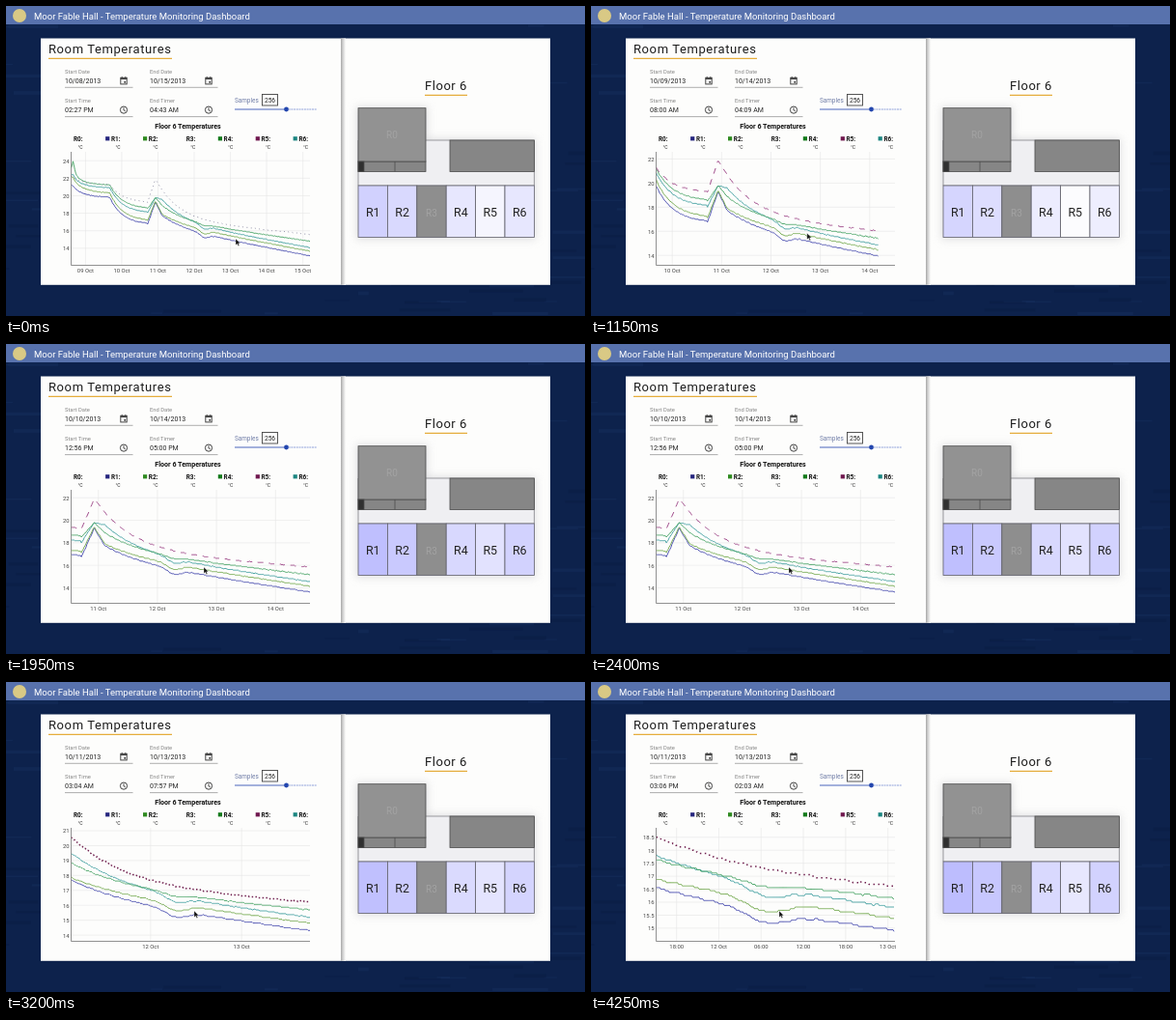
These frames come from a looping animation (600 by 321 pixels, 4.3 s). An HTML page:

```html
<!DOCTYPE html>
<html lang="en">
<head>
<meta charset="utf-8">
<title>Temperature Dashboard</title>
<style>
  html, body { margin: 0; width: 100%; height: 100%; overflow: hidden; background: #0d224c; }
  svg { display: block; width: 100vw; height: 100vh; font-family: Roboto, "Open Sans", sans-serif; }
  .label { font-size: 5.8px; fill: #858585; }
  .value { font-size: 7px; fill: #222; }
  .tick { font-size: 5.9px; fill: #444; }
  .key { font-size: 6.4px; font-weight: 700; fill: #111; }
  .unit { font-size: 5px; fill: #333; }
  .rule { stroke: #8d8d8d; stroke-width: .7; }
  .icon { fill: none; stroke: #444; stroke-width: 1; }
  .room { stroke: #62626c; stroke-width: .8; }
  .name { font-size: 12.4px; fill: #222; text-anchor: middle; }
  .faint { font-size: 10px; fill: #a3a3a3; }
  .curve { fill: none; stroke-width: .9; stroke-linejoin: round; }
  .grid { stroke: #e6e6e6; stroke-width: .6; }
</style>
</head>
<body>
<svg viewBox="0 0 600 321" preserveAspectRatio="none">
  <defs>
    <linearGradient id="fold">
      <stop offset="0" stop-color="#a6a6a6"/>
      <stop offset=".4" stop-color="#cfcfcf"/>
      <stop offset="1" stop-color="#fdfdfc"/>
    </linearGradient>
    <filter id="soft" x="-30%" y="-30%" width="160%" height="160%"><feGaussianBlur stdDeviation="4"/></filter>
    <clipPath id="plot"><rect x="67.5" y="150" width="248" height="118"/></clipPath>
  </defs>

  <rect width="600" height="321" fill="#0d224c"/>
  <g id="streaks"></g>
  <rect width="600" height="19" fill="#5872ad"/>
  <circle cx="14" cy="10" r="7" fill="#d9c985"/>
  <text x="29" y="13.6" font-size="9.5" fill="#fff">Moor Fable Hall - Temperature Monitoring Dashboard</text>

  <rect x="36" y="33.5" width="528" height="255.3" fill="#fdfdfc"/>
  <rect x="347" y="33.5" width="5" height="255.3" fill="url(#fold)"/>
  <g font-size="13" fill="#1d1d1d">
    <text x="44" y="49" letter-spacing=".6">Room Temperatures</text>
    <text x="434" y="86.6" letter-spacing=".55">Floor 6</text>
  </g>
  <path d="M44 54.3H172M434 92.3H478" stroke="#e5ad3c" stroke-width="1.3"/>

  <g id="form"></g>
  <text x="237" y="100" font-size="6.4" fill="#717ea8">Samples</text>
  <rect x="265.5" y="91.5" width="16" height="11.5" fill="#fff" stroke="#444" stroke-width=".9"/>
  <text x="273.5" y="99.7" font-size="6.6" text-anchor="middle" fill="#222">256</text>
  <path d="M237 107H290" stroke="#4a67bd" stroke-width="1.1"/>
  <path d="M290 107H322" stroke="#8fa2da" stroke-width="1.1" stroke-dasharray="2 .7"/>
  <circle cx="290.5" cy="107" r="2.4" fill="#2346ae"/>

  <text x="188.5" y="127.3" font-size="7.1" font-weight="700" text-anchor="middle" fill="#111">Floor 6 Temperatures</text>
  <g id="legend"></g>
  <g id="axes"></g>
  <g id="curves" clip-path="url(#plot)"></g>
  <path d="M67.5 151V268.5H315" fill="none" stroke="#777" stroke-width=".8"/>

  <path d="M363 104h74v33h112v105H363z" fill="#c9c9cd" opacity=".55" filter="url(#soft)"/>
  <path d="M365 139H547.4V186H365z" fill="#efeff2" stroke="#85858a" stroke-width=".8"/>
  <g fill="#868686" stroke="#4d4d4d" stroke-width=".8">
    <rect x="365" y="161" width="70" height="10.5"/>
    <path d="M403 161V171.5"/>
    <rect x="365" y="105.7" width="70" height="55.3" fill="#929292"/>
    <rect x="460" y="139" width="87.4" height="32.5"/>
    <rect x="365" y="161" width="6" height="10.5" fill="#303030"/>
  </g>
  <text x="400" y="137" class="name faint">R0</text>
  <g id="rooms"></g>

  <path id="cursor" d="M0 0V6.6L1.6 5.2L2.7 7.6L3.8 7.1L2.7 4.8H4.7Z" fill="#111" stroke="#fff" stroke-width=".3"/>
</svg>

<script>
const LOOP = 4300, STEP = 50, SAMPLES = 256;
const LEFT = 67.5, RIGHT = 315, TOP = 151, BOTTOM = 268;
const $ = id => document.getElementById(id);
const at = (day, hour, min) => day + hour / 24 + min / 1440;
const clamp = v => Math.min(1, Math.max(0, v));
const mix = (a, b, u) => a + (b - a) * u;

// Each room settles on a shelf, cools to a low, is heated to a peak, then cools for good.
const rooms = {
  R1: { color: "#4146ac", start: 21, spike: .1, shelf: 19.8, low: 16.7, peak: 19.3, level: 16.4, fall: 1.35, drift: .8, dip: .45 },
  R2: { color: "#6fa648", start: 21.8, spike: .3, shelf: 20.3, low: 17.1, peak: 19.4, level: 16.85, fall: 1.05, drift: .78, dip: .45 },
  R6: { color: "#3c9c9d", start: 22, spike: .5, shelf: 20.9, low: 18, peak: 19.8, level: 17.15, fall: 2.45, drift: .75, dip: .4 },
  R4: { color: "#45a263", start: 22.4, spike: 1.7, shelf: 21.2, low: 18.5, peak: 19.8, level: 17.25, fall: 1.65, drift: .6, dip: .2 },
  R5: { color: "#70204f", start: 22, spike: .3, shelf: 21.3, low: 19.2, peak: 21.9, level: 17.3, fall: 3.4, drift: .42, dip: 0 }
};
const SET_UP = 8.66, NIGHT = 9.67, HEAT = 10.71, PEAK = 10.93, COOL = 11.11, DIP = 12.28;

function temperature(r, d) {
  if (d < NIGHT) return mix(r.shelf, r.start, Math.exp((SET_UP - d) / .3)) + r.spike * Math.exp(-Math.abs(d - SET_UP) / .05);
  if (d < HEAT) return mix(r.low, r.shelf, Math.exp((NIGHT - d) / .35));
  if (d < PEAK) return mix(r.low, r.peak, (d - HEAT) / (PEAK - HEAT));
  if (d < COOL) return mix(r.peak, r.level + r.fall, (d - PEAK) / (COOL - PEAK));
  return r.level + r.fall * Math.exp((COOL - d) / .6) - r.drift * (d - COOL)
    - r.dip * Math.exp(-(((d - DIP) / .16) ** 2));
}

// The sensors report sixteenths of a degree.
const reading = (r, d) => Math.round(16 * (temperature(r, d) + .02 * Math.sin(d * 61 + r.start * 9))) / 16;

// Chosen start and end, drag in days, visible share, cursor x and y.
const first = [at(8, 14, 27), at(15, 4, 43), 0, 1, 238, 241];
const zoomed = [at(9, 8, 0), at(14, 4, 9), 0, 1, 238, 241];
const legs = [
  { from: 100, to: 500, view: zoomed },
  { from: 900, to: 1500, view: [zoomed[0], zoomed[1], .816, 1, 204, 227] },
  { from: 1600, to: 1900, view: [at(10, 12, 56), at(14, 17, 0), 0, .97, 205, 231] },
  { from: 2600, to: 3100, view: [at(11, 3, 4), at(13, 19, 57), 0, .97, 195, 237] },
  { from: 3300, to: 3550, view: [at(11, 12, 14), at(13, 6, 19), 0, .97, 195, 237] },
  { from: 3850, to: 4100, view: [at(11, 15, 6), at(13, 2, 3), 0, .97, 195, 237] }
];
const state = t => legs.reduce((now, { from, to, view }) =>
  now.map((v, i) => mix(v, view[i], clamp((t - from) / (to - from)))), first);

const pad = n => String(n).padStart(2, "0");
function stamp(d) {
  const total = Math.round(d * 1440), hour = Math.floor(total / 60) % 24;
  return {
    date: `10/${pad(Math.floor(total / 1440))}/2013`,
    time: `${pad(hour % 12 || 12)}:${pad(total % 60)} ${hour < 12 ? "AM" : "PM"}`
  };
}

// Brushed backdrop
let seed = 7;
const random = () => (seed = seed * 16807 % 2147483647) / 2147483647;
$("streaks").innerHTML = Array.from({ length: 140 }, () =>
  `<rect x="${random() * 620 - 30}" y="${19 + random() * 300}" width="${10 + random() * 50}" height="${1 + random() * 3}"
    fill="${random() < .5 ? "#1b3768" : "#081a3d"}" opacity=".3"/>`).join("");

const calendar = (x, y) => `<g class="icon"><rect x="${x - 3.2}" y="${y - 3}" width="6.4" height="6.6"/>
  <path d="M${x - 3.2} ${y - 2.1}h6.4" stroke-width="1.8"/><path d="M${x - 1.8} ${y - 4.2}v1.5m3.6 0v-1.5"/></g>
  <rect x="${x + .3}" y="${y + .6}" width="1.8" height="1.8" fill="#444"/>`;
const clock = (x, y) => `<g class="icon" stroke-width=".8"><circle cx="${x}" cy="${y}" r="3.6"/>
  <path d="M${x} ${y - 2.2}v2.5l1.7 1"/></g>`;
const field = (id, label, x, y, icon) => `<text class="label" x="${x}" y="${y}">${label}</text>
  <text class="value" id="${id}" x="${x}" y="${y + 10.3}"></text>
  <path class="rule" d="M${x} ${y + 14.8}h70.5"/>${icon(x + 61, y + 7.8)}`;

$("form").innerHTML = field("date0", "Start Date", 61, 69.5, calendar) + field("date1", "End Date", 149, 69.5, calendar)
  + field("time0", "Start Time", 61, 99.8, clock) + field("time1", "End Timer", 149, 99.8, clock);

const swatches = { 1: "#25257e", 2: "#2f8a20", 4: "#137a1b", 5: "#70184f", 6: "#1b8580" };
$("legend").innerHTML = Array.from({ length: 7 }, (_, i) => {
  const x = 70 + i * 38.9;
  return (swatches[i] ? `<rect x="${x - 5.8}" y="135.2" width="4.2" height="4.2" fill="${swatches[i]}"/>` : "")
    + `<text class="key" x="${x}" y="139.8">R${i}:</text><text class="unit" x="${x + 4.5}" y="148">°C</text>`;
}).join("");

const WIDE = 30.4;
$("rooms").innerHTML = Array.from({ length: 6 }, (_, i) => {
  const id = `R${i + 1}`, x = 365 + i * WIDE;
  return `<rect class="room" id="${id}" x="${x}" y="186" width="${WIDE}" height="53.5" fill="#8e8e8e"/>
    <text class="name ${rooms[id] ? "" : "faint"}" x="${x + WIDE / 2}" y="217.6">${id}</text>`;
}).join("");

$("curves").innerHTML = Object.keys(rooms).map(id =>
  `<path class="curve" id="curve${id}" stroke="${rooms[id].color}"/>`).join("");

const dotStyle = span => span > 6 ? ["#8c8ca3", "1 3.5", 1] : span > 3.5 ? ["#a04c8b", "6 6", 1]
  : ["#70204f", span > 1.5 ? "1.5 2.3" : "1.5 3.5", 1.5];

const ticks = (from, to, step) => {
  const list = [];
  for (let v = Math.ceil(from / step) * step; v <= to; v += step) list.push(v);
  return list;
};

// Lowest and highest reading in the chosen range, with a tenth to spare.
function limits(start, end) {
  const all = Object.values(rooms).flatMap(r =>
    Array.from({ length: SAMPLES }, (_, i) => reading(r, mix(start, end, i / SAMPLES))));
  const min = Math.min(...all), max = Math.max(...all), spare = (max - min) / 10;
  return [min - spare, max + spare];
}

function draw(t) {
  const [start, end, drag, share, cx, cy] = state(t);
  const [lo, hi] = limits(start, end);
  const span = (end - start) * share, d0 = start + drag, d1 = d0 + span;
  const px = d => mix(LEFT, RIGHT, (d - d0) / span);
  const py = v => mix(BOTTOM, TOP, (v - lo) / (hi - lo));

  [start, end].forEach((d, i) => {
    const { date, time } = stamp(d);
    $("date" + i).textContent = date;
    $("time" + i).textContent = time;
  });

  const scale = (BOTTOM - TOP) / (hi - lo);
  const rows = ticks(lo, hi, scale > 25 ? .5 : scale > 13 ? 1 : 2).map(v => {
    const y = py(v);
    return `<path class="grid" d="M${LEFT} ${y}H${RIGHT}"/>
      <text class="tick" x="65.5" y="${y + 2.4}" text-anchor="end">${v}</text>`;
  });
  const cols = ticks(d0, d1, span < 2.1 ? .25 : 1).map(d => {
    const x = px(d), text = d % 1 ? `${pad(d % 1 * 24)}:00` : `${pad(d)} Oct`;
    return `<path class="grid" d="M${x} ${TOP}V${BOTTOM}"/>
      <text class="tick" x="${x}" y="276" text-anchor="middle">${text}</text>`;
  });
  $("axes").innerHTML = rows.join("") + cols.join("");

  for (const [id, room] of Object.entries(rooms)) {
    const points = [];
    for (let d = d0; d <= Math.min(d1, end); d += span / SAMPLES)
      points.push(`${px(d).toFixed(1)} ${py(reading(room, d)).toFixed(1)}`);
    $("curve" + id).setAttribute("d", "M" + points.join("L"));
    // Warmer rooms are paler.
    const tint = Math.round(208 + 21 * (temperature(room, (start + end) / 2) - 16.1));
    $(id).setAttribute("fill", `rgb(${tint},${tint},254)`);
  }
  const [color, dash, width] = dotStyle(span);
  Object.assign($("curveR5").style, { stroke: color, strokeDasharray: dash, strokeWidth: width });
  $("cursor").setAttribute("transform", `translate(${cx} ${cy})`);
}

const began = performance.now();
function tick() {
  const t = (performance.now() - began) % LOOP;
  draw(Math.floor(t / STEP) * STEP);
  requestAnimationFrame(tick);
}
tick();
</script>
</body>
</html>
```
